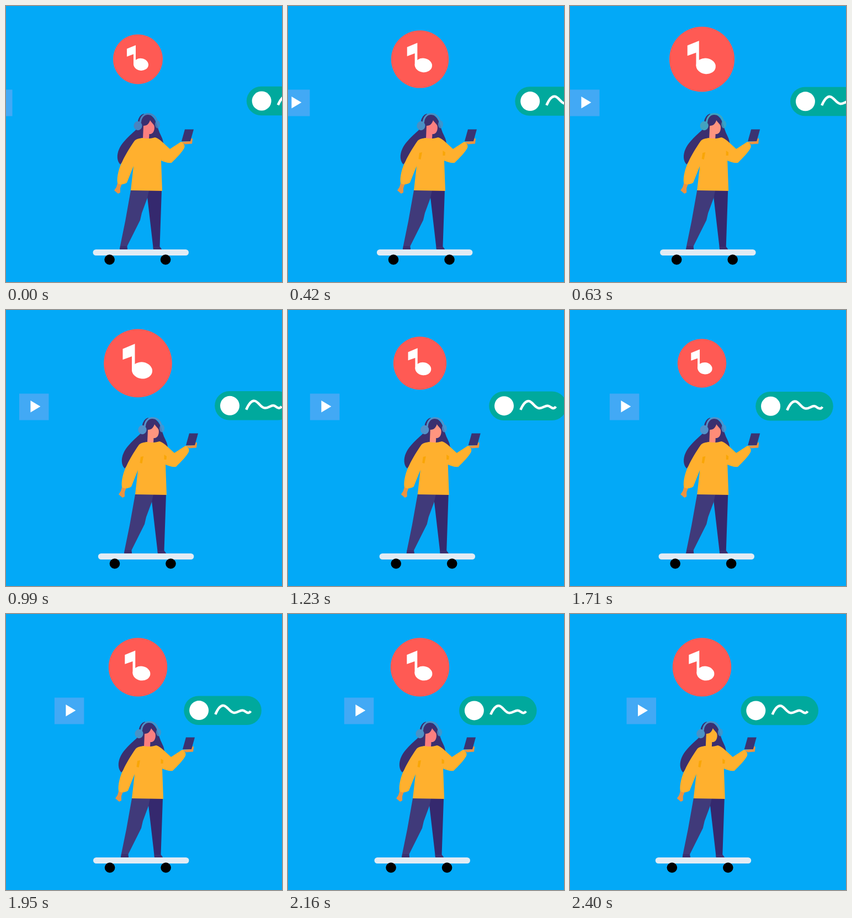
An HTML page that plays this animation: 500 px wide and 500 px high, repeating every 2730 ms.

```html
<!DOCTYPE html>
<html lang="en">
<head>
<meta charset="utf-8">
<title>Skater with phone</title>
<style>
  html, body { margin: 0; width: 100%; height: 100%; overflow: hidden; background: #03a9f7; }
  svg { display: block; width: 100%; height: 100%; }
</style>
</head>
<body>
<svg viewBox="0 0 500 500">
  <g id="music">
    <circle r="61.75" fill="#ff5a54"/>
    <g fill="#fff">
      <path d="M-27.5-26L-5.5-35V13H-11V-12.5L-27.5-6.5Z"/>
      <ellipse cx="7.5" cy="13" rx="18.6" ry="15" transform="rotate(8 7.5 13)"/>
    </g>
  </g>

  <g id="play">
    <rect width="53.5" height="48" fill="#42a9f5"/>
    <path d="M20.5 12.5L38.5 23.3L20.5 34Z" fill="#fff"/>
  </g>

  <g id="pill">
    <rect width="140.5" height="52.5" rx="26.25" fill="#00a99d"/>
    <circle cx="27.3" cy="26.2" r="17.5" fill="#fff"/>
    <path d="M57 33.5C62 22 67 17 72 17.5C79 18 83 30.5 91 30.5C97 30.5 101 26 106 26C111 26 112 31 117 30.5C119 30.3 120 29 121 27.5"
      fill="none" stroke="#fff" stroke-width="4.5"/>
  </g>

  <g id="girl">
    <path d="M258 196C248 196 243 205 242 217C236 226 214 240 205 259C200 270 201 281 207 287L240 250H285C285 240 279 233 277 226C274 219 272 200 258 196Z" fill="#3b2f6f"/>
    <path class="skin" d="M249 217C256 217 259 213 261 207C264 212 267 213 268.5 217C270 224 267 231 262 232H259.5L259 241Q253 243 248 240Z"/>
    <ellipse class="cup" cx="274.5" cy="214.5" rx="4.5" ry="7" opacity=".8"/>
    <path d="M240 211C241 203 245 198 250 196.5" fill="none" stroke="#3b2f6f" stroke-width="3"/>
    <path class="band" d="M243.5 211C244 200 251 195.5 257 195.5C266 195.5 271 201 273 208" fill="none" stroke-width="3"/>
    <ellipse class="cup" cx="239" cy="217" rx="7.6" ry="8.2"/>

    <path d="M257 334H282L278.5 436L282 441H267L256 346Z" fill="#35296e"/>
    <path d="M226 334H259L256 348L246 375L243 388L219 436L220 441H206L207 434L216 390Z" fill="#403a7a"/>
    <path d="M207 435H219.3L220 441H206ZM266.5 436H278.5L282 441H267Z" fill="#3b2f6f"/>

    <path d="M202 321L210 322L207 330V338L203 340L196 334L200 328ZM318 246L333 245L336.5 239L338 241L337 249.5L324 250.5Z" fill="#ec9340"/>
    <path d="M247 239C255 241 264 240 270 238C276 239 283 246 297 259L317 246C321 247 325 252 323 257C320 264 308 276 300 284C294 285 288 283 281 280L283 335L226 334L231 290L219 320C213 324 205 324 202 321C200 310 205 292 211 281C216 270 224 257 233 244C237 240 242 240 247 239Z" fill="#ffb02e"/>
    <path id="folds" d="M236 266L241 265L238.5 278L234.5 277ZM278.5 262L283 265L282.5 271H278.5Z" fill="#f9a607"/>
    <path d="M324 223.5H340L334 245H318Z" fill="#3b3371"/>
  </g>

  <g id="board">
    <rect x="157.5" y="441" width="173.5" height="11" rx="5.5" fill="#e1ebf4"/>
    <circle cx="187.6" cy="459.5" r="9.3"/>
    <circle cx="289.1" cy="459.5" r="9.3"/>
  </g>
</svg>

<script>
const LOOP = 2730, STEP = 30, LAST = 2400;

// [time in ms, value]
const tracks = {
  radius: [[0, 45], [100, 42.2], [420, 52.2], [630, 59], [900, 67], [990, 61.8], [1485, 33.6], [1900, 53.2], [LAST, 53.2]],
  girl:   [[0, 0], [140, -1], [1140, 9.6], [LAST, -2.2]],
  board:  [[0, 0], [420, 3.4], [1050, 10], [1950, .5], [LAST, -2.8]],
  playX:  [[0, -42], [2170, 102.5], [LAST, 102.5]],
  pillX:  [[0, 435.8], [2170, 309.5], [LAST, 309.5]],
  pillY:  [[0, 145.8], [2170, 148.7], [LAST, 148.7]]
};
const skin = [[0, '#fb7f7f'], [630, '#ff957f'], [1470, '#ff8c78'], [1950, '#fb7f7f'], [2190, '#ffb02e']];
const phones = [[0, '#4a84c0'], [420, '#4a90c4'], [630, '#42a3c0'], [810, '#5292ca'], [1950, '#4a92c6']];

const $ = id => document.getElementById(id);
const all = name => document.querySelectorAll('.' + name);

function at(track, t) {
  const i = Math.max(1, track.findIndex(k => k[0] >= t));
  const [t0, a] = track[i - 1], [t1, b] = track[i];
  return a + (b - a) * (t - t0) / (t1 - t0);
}

const held = (list, t) => list.filter(k => k[0] <= t).pop()[1];
const move = (id, x, y, s = 1) =>
  $(id).setAttribute('transform', `translate(${x} ${y}) scale(${s})`);
const paint = (name, prop, color) => all(name).forEach(el => el.style[prop] = color);

function draw(t) {
  const v = {};
  for (const name in tracks) v[name] = at(tracks[name], t);
  move('music', 239, 96.4, v.radius / 61.75);
  move('play', v.playX, 151.5);
  move('pill', v.pillX, v.pillY);
  move('girl', v.girl, 0);
  move('board', v.board, 0);
  paint('skin', 'fill', held(skin, t));
  paint('cup', 'fill', held(phones, t));
  paint('band', 'stroke', held(phones, t));
  $('folds').style.opacity = t < 210 ? 0 : 1;
}

const start = performance.now();
function tick() {
  const t = (performance.now() - start) % LOOP;
  draw(Math.min(LAST, Math.floor(t / STEP) * STEP));
  requestAnimationFrame(tick);
}
tick();
</script>
</body>
</html>
```
